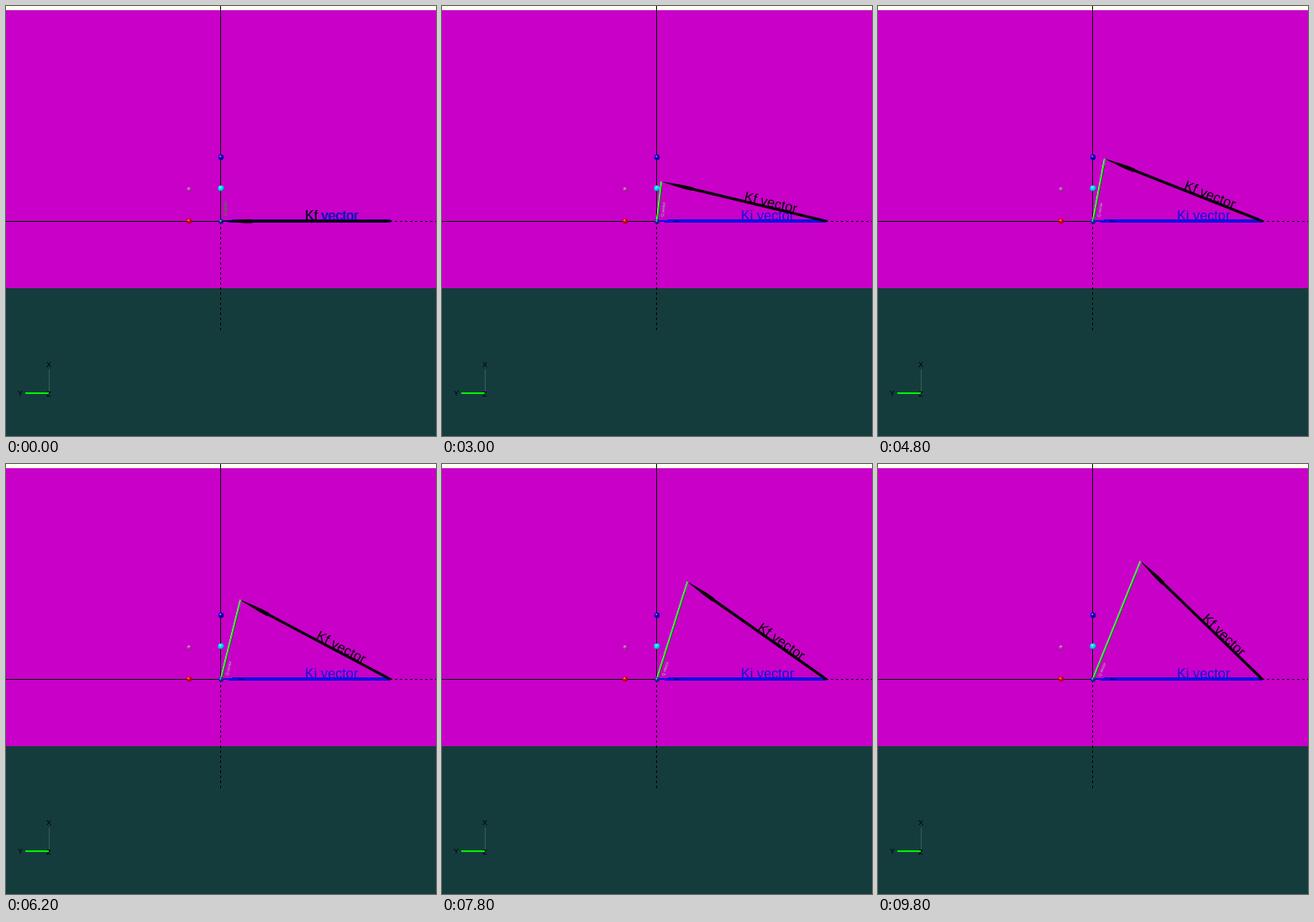
These frames come from a looping animation (512 px wide and 512 px high, 10000 ms). An HTML page:

```html
<!DOCTYPE html>
<html lang="en">
<head>
<meta charset="utf-8">
<title>Rotating Kf vector</title>
<style>
  html, body { margin: 0; width: 100%; height: 100%; overflow: hidden; }
  svg { display: block; width: 100%; height: 100%; }
  text { font-family: "Liberation Sans", Arial, sans-serif; }
  .label { font-size: 16.3px; }
  .gizmo { font-size: 9px; text-anchor: middle; }
  .crisp { shape-rendering: crispEdges; }
  .axis { stroke: #000; fill: none; }
  .dashed { stroke-dasharray: 3 3; }
</style>
</head>
<body>
<svg viewBox="0 0 512 512">
  <defs>
    <radialGradient id="shade" cx=".38" cy=".35" r=".7">
      <stop offset="0" stop-color="#fff" stop-opacity=".75"/>
      <stop offset=".35" stop-color="#fff" stop-opacity="0"/>
      <stop offset=".6" stop-color="#000" stop-opacity="0"/>
      <stop offset="1" stop-color="#000" stop-opacity=".55"/>
    </radialGradient>
  </defs>

  <g class="crisp">
    <rect width="512" height="512" fill="#153c3c"/>
    <rect width="512" height="336" fill="#c800c8"/>
    <rect width="512" height="5" fill="#fffff0"/>
    <path class="axis" d="M255.5 0V256M0 256.5H256"/>
    <path class="axis dashed" d="M255.5 257V388M457 256.5H512"/>
    <path stroke="#3c5c5c" d="M51.5 433V460"/>
    <path stroke="#00f000" stroke-width="2" d="M23 461H51"/>
  </g>
  <g class="gizmo">
    <text x="51" y="430">X</text>
    <text x="17" y="464">Y</text>
    <text x="51" y="465">Z</text>
  </g>

  <g id="balls"></g>

  <!-- Both arrows start at the pivot and point left. -->
  <g transform="translate(457.5 256.2)">
    <g fill="#1010e0">
      <path class="crisp" d="M0-1.9H-186L-201-.4V.5L-186 1.9H0Z"/>
      <path d="M-172 0l-9-1v2z" fill="#000078"/>
      <text class="label" x="-101.5" y="-.8">Ki vector</text>
    </g>
    <path class="crisp" d="M-4-1H1V1H-4Z"/>
    <g id="kf">
      <path d="M0-1.1L-5-1.6H-164V-2.2H-174L-200-.3V.3L-174 2.2H-164V1.6H-5L0 1.1Z"/>
      <text class="label" x="-101.5" y="-.8">Kf <tspan id="kfWord">vector</tspan></text>
    </g>
  </g>

  <!-- Q joins the origin to the tip of Kf. -->
  <g transform="translate(256 256.2)">
    <g id="q">
      <g id="qLine">
        <path id="qEdge" stroke="#fff" fill="none"/>
        <path id="qShade" stroke="#103810" fill="none"/>
        <path id="qCore" stroke="#00f000" stroke-width="1.5" fill="none"/>
      </g>
      <text id="qLabel" x="6" y="7.2" font-size="4.6">Q vector</text>
    </g>
  </g>
</svg>
<script>
  const STEP_MS = 200, STEPS = 50, DEGREES_PER_STEP = 0.9, RADIUS = 201.5;
  const byId = id => document.getElementById(id);
  const set = (id, name, value) => byId(id).setAttribute(name, value);

  const balls = [
    [256, 180, 3.2, "#0000c8"],
    [256, 217, 3.6, "#00d8f0"],
    [218, 256, 3.1, "#e00000"],
    [218, 218, 2.6, "#c040b0"],
    [256, 256.5, 2.9, "#1030a0"]
  ];
  byId("balls").innerHTML = balls.map(([x, y, r, color]) =>
    [color, "url(#shade)"].map(fill =>
      `<circle cx="${x}" cy="${y}" r="${r}" fill="${fill}"/>`).join("")).join("");

  function draw(now) {
    const step = Math.floor(now / STEP_MS) % STEPS;
    const angle = step * DEGREES_PER_STEP;
    const length = 2 * RADIUS * Math.sin(angle * Math.PI / 360);

    set("kf", "transform", `rotate(${angle})`);
    set("kfWord", "fill", step ? "#000" : "#1414a8");
    set("q", "transform", `rotate(${angle / 2 - 90})`);
    set("qLine", "visibility", step ? "visible" : "hidden");
    set("qEdge", "d", `M2-.7H${length}`);
    set("qShade", "d", `M2 .8H${length * 0.9}`);
    set("qCore", "d", `M2 0H${length}`);
    set("qLabel", "fill", step ? "#a0e8a0" : "#00c000");
    requestAnimationFrame(draw);
  }
  draw(performance.now());
</script>
</body>
</html>
```
